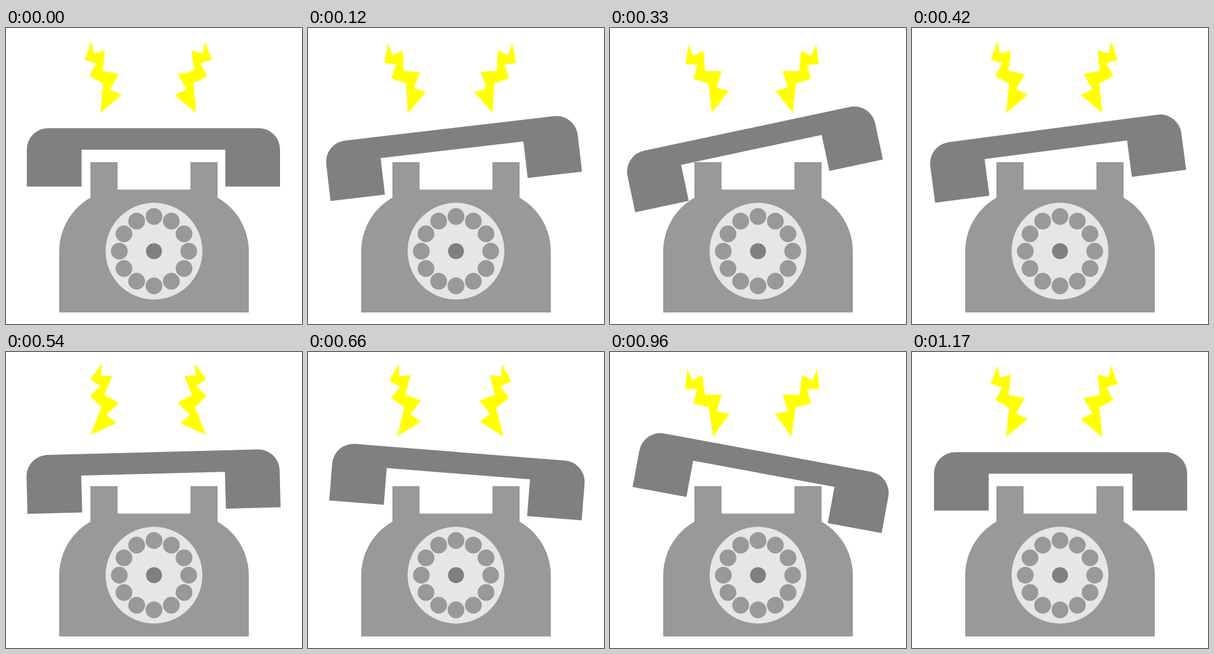
These frames come from a looping animation (512x512 px, 1.2 s). An HTML page:

```html
<!DOCTYPE html>
<html lang="en">
<head>
<meta charset="utf-8">
<title>Ringing telephone</title>
<style>
  html, body { margin: 0; width: 100%; height: 100%; overflow: hidden; background: #fff; }
  svg { display: block; width: 100%; height: 100%; }
</style>
</head>
<body>
<svg viewBox="0 0 512 512">
  <defs>
    <polygon id="bolt" fill="#ff0" points="-20,-62 -16,-41 3,-46 -1,-11 27,-5 12,21 32,31 -5,62 0,11 -24,-2 -12,-24 -32,-30"/>
  </defs>
  <g fill="#999">
    <path d="M92 492V386.5A107 107 0 0 1 146 293.5V232H193V279.5H319V232H366V293.5A107 107 0 0 1 420 386.5V492Z"/>
    <circle cx="256" cy="386" r="83.7" fill="#e6e6e6"/>
    <g id="holes"></g>
    <circle cx="256" cy="386" r="13.8" fill="#808080"/>
  </g>
  <path id="handset" fill="#808080" d="M-219 50.5V-13.5A37 37 0 0 1 -182 -50.5H182A37 37 0 0 1 219 -13.5V50.5H124.3V-13.2H-124.3V50.5Z"/>
  <use id="left" href="#bolt"/>
  <use id="right" href="#bolt"/>
</svg>
<script>
const STEP = 30, STEPS = 40;
const KEYS = [0, 9, 19, 29, 39];
const TILT = [0, -15, 0, 15, 0];
const SHIFT = [255, 245.2, 255.8, 266.5, 257];
const SWING = [0, -20, 20, -20, 0];

const el = id => document.getElementById(id);
const handset = el("handset"), left = el("left"), right = el("right");

for (let i = 0; i < 12; i++) {
  const a = i * Math.PI / 6;
  const hole = document.createElementNS("http://www.w3.org/2000/svg", "circle");
  hole.setAttribute("cx", 256 + 60 * Math.sin(a));
  hole.setAttribute("cy", 386 - 60 * Math.cos(a));
  hole.setAttribute("r", 14.5);
  el("holes").append(hole);
}

// Linear interpolation between the shared key steps
function at(values, step) {
  let i = 0;
  while (i < KEYS.length - 2 && step > KEYS[i + 1]) i++;
  const k = (step - KEYS[i]) / (KEYS[i + 1] - KEYS[i]);
  return values[i] + (values[i + 1] - values[i]) * k;
}

function place(node, x, y, angle, flip = 1) {
  node.setAttribute("transform", `translate(${x} ${y}) scale(${flip} 1) rotate(${angle})`);
}

function draw(ms) {
  const step = Math.floor(ms / STEP) % STEPS;
  const swing = at(SWING, step);
  place(handset, at(SHIFT, step), 223.7, at(TILT, step));
  place(left, 168, 85, swing);
  place(right, 324, 85, swing, -1);
}

const start = performance.now();
function tick() {
  draw(performance.now() - start);
  requestAnimationFrame(tick);
}
tick();
</script>
</body>
</html>
```
